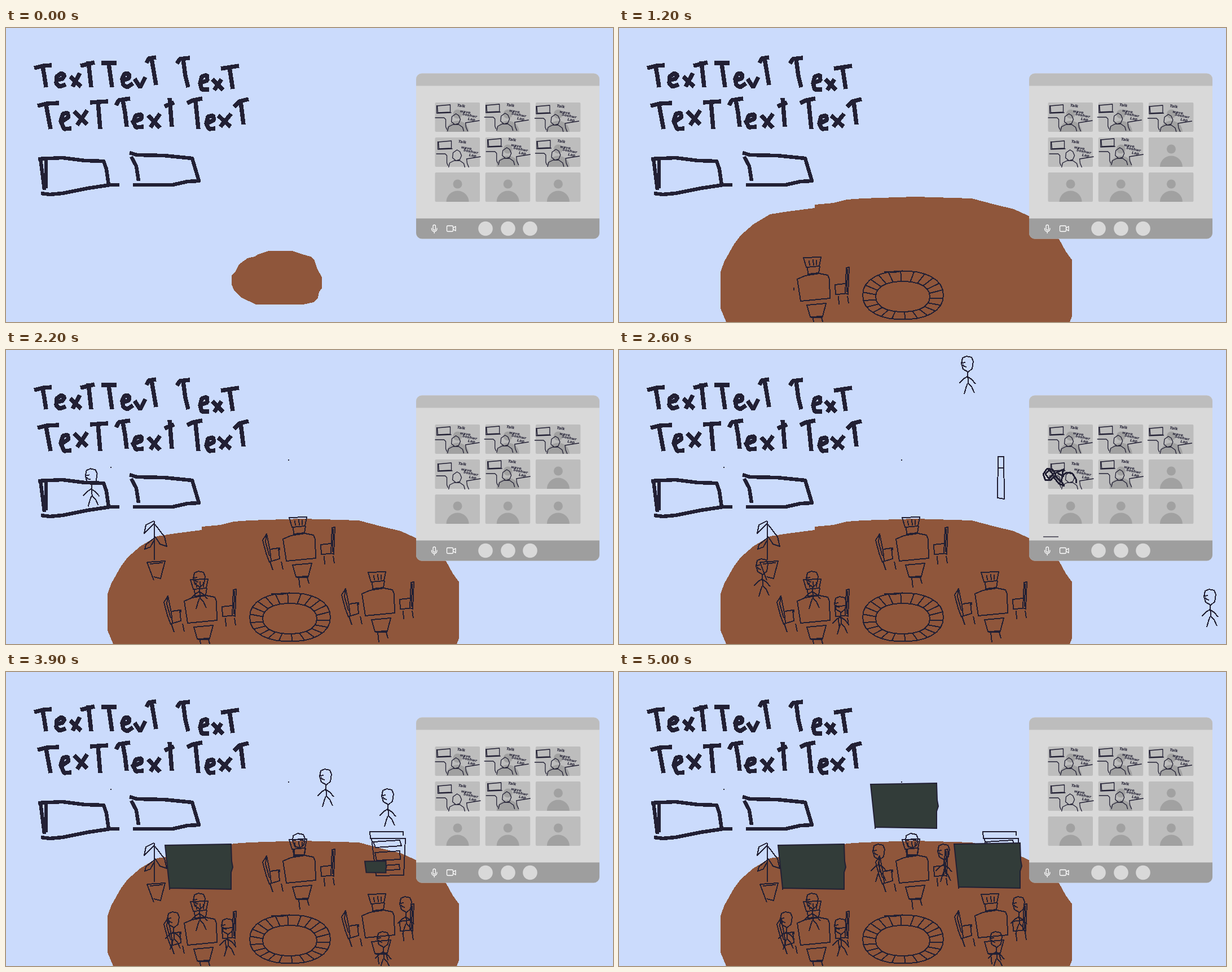
These frames come from a looping animation (1076 by 521 pixels, 5400 ms). An HTML page:

```html
<!DOCTYPE html>
<html lang="en">
<head>
<meta charset="utf-8">
<title>Sketching a meeting room</title>
<style>
  html, body { margin: 0; width: 100%; height: 100%; overflow: hidden; background: #cbdbfc; }
  svg { display: block; width: 100%; height: 100%; }
  .ink { fill: none; stroke: #222034; stroke-width: 2; stroke-linejoin: round; shape-rendering: crispEdges; }
  .marker { stroke-width: 7.5; stroke-linejoin: bevel; }
  .box { stroke-width: 6.5; }
  .wood { fill: #8f563b; shape-rendering: crispEdges; }
  .board { fill: #323c39; stroke: #222034; stroke-width: 2; vector-effect: non-scaling-stroke; }
  .icon { fill: none; stroke: #fff; stroke-width: 1.3; stroke-linecap: round; stroke-linejoin: round; }
  .thin { stroke-width: 1.3; shape-rendering: auto; }
  .note { font: italic bold 7px "DejaVu Sans", sans-serif; fill: #222034; }
</style>
</head>
<body>
<svg viewBox="0 0 1076 521" preserveAspectRatio="none">
  <rect width="1076" height="521" fill="#cbdbfc"/>
  <g id="room"></g>
  <g id="furniture"></g>
  <g id="boards"></g>
  <g id="call"></g>
  <g id="people"></g>
</svg>
<script>
const STEP = 100, LOOP = 5400, LAST = 50;
const layer = id => document.getElementById(id);
const room = layer('room'), furniture = layer('furniture'), boards = layer('boards'),
      call = layer('call'), people = layer('people');
const timed = [], moving = [];

function add(parent, tag, attrs = {}) {
  const el = document.createElementNS('http://www.w3.org/2000/svg', tag);
  for (const key in attrs) el.setAttribute(key, attrs[key]);
  parent.append(el);
  return el;
}

// Visible from step `from` up to, but not including, step `to`.
function during(el, from, to = LAST + 1) {
  timed.push({ el, from, to });
  return el;
}

const line = (parent, d, cls = 'ink') => add(parent, 'path', { d, class: cls });
const sketch = (d, from, to) => during(line(furniture, d), from, to);

// Hand-lettered words
const letters = [
  // first row
  'M50 71L66 67 81 66M65 68L68 85 71 105M88 93L100 90 104 84 98 80 90 86 89 98 95 104 106 100M114 86L133 104M131 80L118 104M132 67L157 61M146 59L151 105',
  'M169 62L196 62M182 63L188 105M204 94L218 89 218 81 210 81 206 90 208 101 215 105 225 98M228 90L238 105 247 87M249 62L253 54 266 52M258 54L266 101',
  'M303 63L308 55 326 53M314 55L318 85 323 105M342 98L357 93 356 83 347 86 344 98 347 109 360 109M366 91L385 110M382 91L369 110M381 72L413 67M396 69L402 108',
  // second row
  'M56 138L72 134 94 133M71 136L79 179M97 167L111 158 109 150 101 152 97 165 103 179 116 178M121 148L144 171M144 146L126 172M149 132L181 130M163 131L167 179',
  'M195 137L200 128 220 125M207 128L211 150 214 175M222 168L240 161 240 153 230 155 226 166 230 176 244 175M252 155L273 177M273 152L256 176M281 139L298 132M290 124L294 175',
  'M321 133L332 128 348 125M336 130L341 179M354 170L369 163 367 155 358 157 355 170 360 179 371 178M376 155L398 175M399 152L380 175M404 140L414 130 430 126M416 130L421 171'
];
letters.forEach(d => line(room, d, 'ink marker'));
line(room, 'M57 232L100 230 140 235 173 236 178 250 182 278M61 231L68 287M71 234L71 284M62 293L78 295 100 293 145 284 185 278 201 278', 'ink box');
line(room, 'M219 221L232 225 280 226 330 231 342 271 322 272 295 278 225 278M222 228L231 245 235 271', 'ink box');

// Floor: small blob, then stretched over the room
during(add(room, 'path', { class: 'wood', d: 'M400 438L407 431 413 419 428 408 441 405 447 401 466 395 508 395 525 401 540 405 547 412 552 427 560 442 560 461 555 468 553 478 545 486 527 490 443 490 418 478 405 466 400 455Z' }), 0, 1);
during(add(room, 'path', { class: 'wood', d: 'M190 521L180 497 180 432 187 413 204 383 216 367 238 348 268 330 300 325 347 319 347 313 380 310 404 304 432 302 525 299 625 302 667 313 700 321 733 336 780 374 792 396 803 411 803 511 799 521Z' }), 1);

// Table with four chairs, reused at three places
const set = {
  table: 'M316 445L330 439 355 435 370 438 373 445 374 479 322 484ZM310 460L310 465',
  front: 'M333 491L367 487 361 511 339 513ZM325 500L370 497 360 511',
  stool: 'M333 491L367 488 361 511 339 512ZM340 513L361 513M344 513L346 531M359 513L362 524',
  back: 'M327 407L358 406 355 422 332 424ZM337 412L338 421M344 410L345 421M350 411L350 420M334 424L335 436 354 434 356 422',
  left: 'M287 436L280 447 286 470 292 486 295 484 293 465 287 436 285 450 292 475M294 463L308 461 310 480 293 485M293 485L298 500M313 485L316 499',
  right: 'M403 425L401 470 406 472 408 424ZM405 427L404 468M401 453L383 455 384 472 401 471M389 475L390 490M405 475L407 488'
};
function tableSet(x, y, starts) {
  const g = add(furniture, 'g', { transform: `translate(${x} ${y})` });
  for (const part in starts) during(line(g, set[part]), starts[part]);
}
tableSet(0, 0, { table: 2, stool: 8, right: 9, back: 11, left: 13 });
sketch('M325 501L370 497 363 521M325 501L337 521M329 508L367 505M333 515L364 513', 4, 8);
tableSet(175, -110, { table: 15, stool: 15, back: 15, left: 19, right: 19 });
tableSet(315, -13, { table: 20, stool: 20, back: 20, left: 20, right: 20 });

// Loose strokes
sketch('M339 318L343 318 346 350 341 368 339 360Z', 6, 9);
sketch('M512 258L506 320 505 350 509 373 515 375 518 350 517 315ZM512 306L509 345 513 359 514 330Z', 7, 9);
sketch('M470 227L467 250 469 273 472 271 472 230Z', 17, 19);
sketch('M654 378L653 400 659 424 660 405Z', 16, 19);
sketch('M619 442L695 432 710 466 620 474ZM622 474L638 490M701 471L697 487', 16, 20);
sketch('M550 357L585 352 597 366 553 370M556 372L560 385M590 371L586 388M589 318L582 347 584 362 591 367 596 350ZM589 323L594 362', 16, 19);
sketch('M186 207v2', 15);
sketch('M501 194v2', 22);

// Rug
const ring = (cx, cy, rx, ry, a) => {
  const squash = v => Math.sign(v) * Math.abs(v) ** .9;
  return [cx + rx * squash(Math.cos(a)), cy + ry * squash(Math.sin(a))].map(v => v.toFixed(1)).join(' ');
};
const turn = (n, f) => Array.from({ length: n }, (_, i) => f(i * 2 * Math.PI / n));
const outer = a => ring(503.5, 473.5, 71.5, 43, a), inner = a => ring(503, 476, 48, 27, a);
sketch('M' + turn(30, outer).join('L') + 'ZM470 432L490 433 503 430', 10);
sketch('M' + turn(26, inner).join('L') + 'Z', 11);
sketch(turn(22, a => `M${outer(a + .1)}L${inner(a + .1)}`).join(''), 12);

// Plant and shelf
sketch('M263 303L263 372M262 303L248 310 245 325 262 308M263 333L248 345 246 353 256 349 263 336M264 309L281 331 285 348 273 344 264 330M250 376L282 374 274 405 262 402M250 376L262 408M255 379L278 377', 22);
sketch('M672 189L682 189 683 264 671 262ZM672 209L682 209', 25, 28);
sketch('M704 290L704 283 645 283 646 295 708 295 705 360 656 361 648 295M651 301L698 298 701 308 655 311ZM654 320L698 317 699 332 657 334ZM656 344L697 341 698 350 658 352Z', 28);

// Movers hold or glide between [step, x, y, scaleX, scaleY] keys.
function mover(el, keys, to) {
  moving.push({ el, keys });
  return during(el, keys[0][0], to);
}
const blackboard = keys => mover(add(boards, 'path', {
  class: 'board', d: 'M0 2L117 0 118 30 120 41 117 50 117 80 8 78ZM8 76V81'
}), keys);
blackboard([[30, 322, 337, .34, .26], [31, 322, 337, .34, .26], [33, 282, 305, 1, 1]]);
blackboard([[38, 636, 335, .32, .26], [39, 636, 335, .32, .26], [41, 594, 303, 1, 1]]);
blackboard([[49, 446, 197, 1, 1]]);

// Video call window
const rect = (parent, x, y, width, height, fill, rx = 0) => add(parent, 'rect', { x, y, width, height, fill, rx });
rect(call, 727, 80.5, 325, 293, '#d9d9d9', 10);
add(call, 'path', { fill: '#bdbdbd', d: 'M727 102.500v-12a10 10 0 0 1 10-10h305a10 10 0 0 1 10 10v12z' });
add(call, 'path', { fill: '#9e9e9e', d: 'M727 337.500v26a10 10 0 0 0 10 10h305a10 10 0 0 0 10-10v-26z' });
[850, 890, 929].forEach(cx => add(call, 'circle', { cx, cy: 355.5, r: 12.8, fill: '#d9d9d9' }));
line(call, 'M757 351a2.200 2.200 0 0 1 4.400 0v5a2.200 2.200 0 0 1-4.400 0zM754.500 355v1a4.700 4.700 0 0 0 9.400 0v-1M759.200 361v2.500', 'icon');
line(call, 'M783 350.500h8a1.500 1.500 0 0 1 1.500 1.500v7a1.500 1.500 0 0 1-1.500 1.500h-8a1.500 1.500 0 0 1-1.500-1.500v-7a1.500 1.500 0 0 1 1.500-1.500zM792.500 354.500l4.500-3v8l-4.500-3', 'icon');

const nudges = [[0, 0], [-2, -1], [-2, 1], [2, 2], [1, -2], [-1, 1]];
for (let i = 0; i < 9; i++) {
  const tile = add(call, 'g', { transform: `translate(${760.5 + i % 3 * 89.2} ${132 + Math.floor(i / 3) * 62})` });
  rect(tile, 0, 0, 79.5, 52, '#bdbdbd', 2);
  if (i !== 3) {
    add(tile, 'circle', { cx: 40, cy: 20.5, r: 8, fill: '#a1a1a1' });
    add(tile, 'path', { fill: '#a1a1a1', d: 'M20 52a20 19.500 0 0 1 40 0z' });
  }
  if (!nudges[i]) continue;
  const doodle = add(tile, 'g', { transform: `translate(${nudges[i]})` });
  if (i === 5) during(doodle, 0, 9);
  line(doodle, 'M4 6L27 4 27 17 5 18ZM3 5L3 19 29 18M0 27L16 27 19 30 19 43 21 48M37 20L30 25 29 34 35 39 42 37 45 30 42 23ZM22 51L24 43 32 39 42 39 49 44 51 51M58 51L55 44 54 36 66 34 79 32', 'ink thin');
  [['Talk', 39, 7, 8], ['wave', 44, 17, 10], ['Soshwr', 48, 22, 12], ['Lap', 58, 31, 8]].forEach(([text, x, y, angle]) =>
    add(doodle, 'text', { class: 'note', transform: `translate(${x} ${y}) rotate(${angle}) scale(.92)` }).textContent = text);
}

// A figure lifted out of a tile, still lying on its side
const lifted = line(people, 'M752 220L759 210 769 212 774 221 766 230 756 231ZM756 220L762 213 770 220 762 228ZM774 218L789 211 786 218 788 224 777 218M771 226L780 237 790 241M773 223L784 234M786 222L794 217 804 219 810 229 810 236M786 223L784 233 789 240');
lifted.style.strokeWidth = 3;
mover(lifted, [[25, 0, 0], [27, 0, 0], [30, 0, -62]], 32);
during(line(people, 'M752 331H779', 'ink thin'), 26, 28);

// Stick figures, anchored at the top of the head
const figure = 'M-8 3L-1 0 8 2 11 9 9 22 2 28 -7 23 -10 13ZM-8 15L-5 18 -1 19M-9 12L-3 11M1 28L2 49M2 35L-6 40 -14 48M2 37L8 41 15 49M1 48L-2 56 -5 67M2 48L8 54 13 65';
const bust = 'M-10 4L-2 0 8 2 11 9 9 20 2 26 -7 23 -11 13ZM-10 12L0 11 10 13M-8 27L-8 38 10 38 11 27';
const person = (keys, to, d = figure) => mover(line(people, d), keys, to);
person([[13, 538, 35], [15, 538, 98], [18, 538, 98], [21, 342, 392]]);
person([[21, 30, 97], [24, 392, 437]]);
person([[25, 150, 300], [26, 253, 370], [27, 253, 370], [29, 296, 425]]);
person([[25, 617, 11], [26, 617, 11], [30, 657, 333], [31, 657, 333], [34, 668, 460]]);
person([[25, 1047, 424], [27, 1047, 424], [31, 783, 443], [34, 708, 398]]);
person([[30, 720, 166], [31, 720, 166]], 32,
  'M-6 3L2 0 12 3 12 15 6 24 -3 26 -10 20 -11 10ZM4 6L4 12M-4 10L-4 16M3 17L7 17M-4 26L-8 44M-5 37L14 37M-6 31L-18 45M-8 42L-14 53 -16 71M-8 43L0 63');
person([[32, 690, 170], [35, 519, 286]], 35);
person([[35, 519, 286]], undefined, bust);
person([[37, 676, 180], [38, 676, 207], [39, 676, 207], [42, 575, 305]]);
person([[37, 566, 172], [39, 566, 172], [42, 547, 205], [45, 460, 305]]);

function pose(keys, step) {
  const next = keys.findIndex(k => k[0] > step);
  if (next < 1) return next ? keys[keys.length - 1] : keys[0];
  const a = keys[next - 1], b = keys[next], f = (step - a[0]) / (b[0] - a[0]);
  return a.map((v, i) => v + (b[i] - v) * f);
}

let shown = -1;
function draw() {
  const step = Math.min(LAST, Math.floor(performance.now() % LOOP / STEP));
  if (step !== shown) {
    shown = step;
    for (const { el, from, to } of timed) el.style.display = step >= from && step < to ? '' : 'none';
    for (const { el, keys } of moving) {
      const [, x, y, sx = 1, sy = 1] = pose(keys, step);
      el.setAttribute('transform', `translate(${x} ${y}) scale(${sx} ${sy})`);
    }
  }
  requestAnimationFrame(draw);
}
draw();
</script>
</body>
</html>
```
